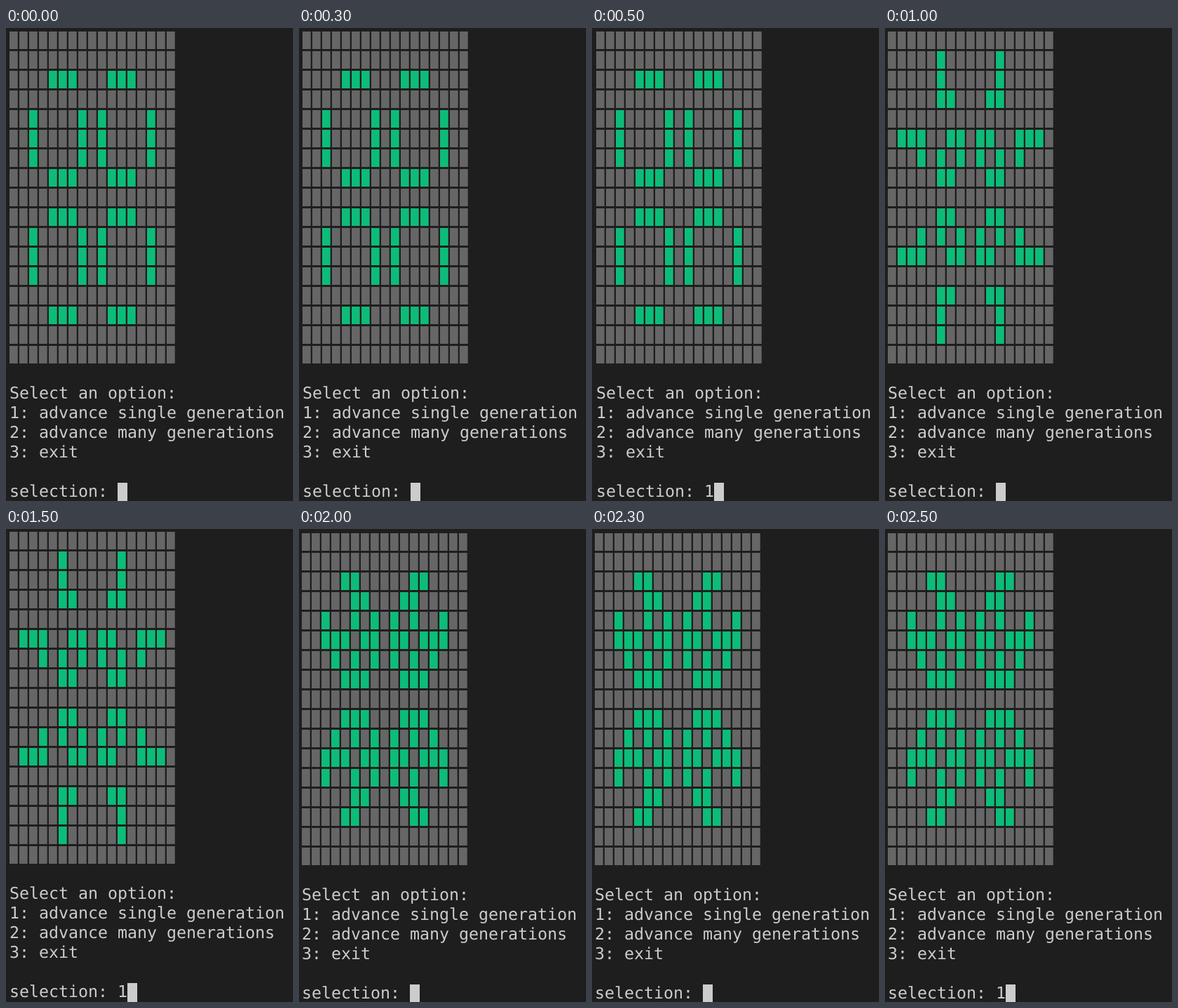
An HTML page that plays this animation: 409 px wide and 674 px high, repeating every 3000 ms.

```html
<!DOCTYPE html>
<html lang="en">
<head>
<meta charset="utf-8">
<title>Game of Life</title>
<style>
  html, body { margin: 0; width: 100%; height: 100%; overflow: hidden; background: #1e1e1e; }
  svg { display: block; width: 409px; height: 674px; }
  text {
    font: 23.254px "DejaVu Sans Mono", "Liberation Mono", monospace;
    fill: #cccccc;
    white-space: pre;
    text-rendering: geometricPrecision;
  }
</style>
</head>
<body>
<svg viewBox="0 0 409 674">
  <g id="screen">
    <path id="dead" fill="#666666"/>
    <path id="live" fill="#0dbc79"/>
    <g id="menu"></g>
    <rect id="cursor" y="643" width="14" height="28" fill="#cccccc"/>
  </g>
</svg>
<script>
const SIZE = 17, COL = 14, ROW = 28, STEP = 500;
const MENU_ROW = 18, PROMPT_ROW = 23, BASELINE = 19;
const PROMPT = 'selection: ';
// Where the terminal sits on the stage in each step
const OFFSETS = [[5, 5], [6, 5], [4, 5], [5, 4], [4, 6], [4, 6]];

const el = id => document.getElementById(id);

// Pulsar: bars lie on lines 2, 7, 9, 14 and span 4-6 and 10-12
const onLine = n => [2, 7, 9, 14].includes(n);
const inSpan = n => (n >= 4 && n <= 6) || (n >= 10 && n <= 12);

function makeGrid(rule) {
  return Array.from({ length: SIZE }, (_, y) =>
    Array.from({ length: SIZE }, (_, x) => rule(x, y)));
}

function advance(grid) {
  return makeGrid((x, y) => {
    let near = 0;
    for (let dy = -1; dy <= 1; dy++)
      for (let dx = -1; dx <= 1; dx++)
        if ((dx || dy) && grid[y + dy]?.[x + dx]) near++;
    return near === 3 || (near === 2 && grid[y][x]);
  });
}

function cellPath(grid, alive) {
  let d = '';
  grid.forEach((line, y) => line.forEach((cell, x) => {
    if (cell === alive) d += `M${x * COL} ${y * ROW}h11.7v25h-11.7z`;
  }));
  return d;
}

function addLine(row, words) {
  const line = document.createElementNS('http://www.w3.org/2000/svg', 'text');
  line.setAttribute('y', row * ROW + BASELINE);
  line.textContent = words;
  el('menu').append(line);
  return line;
}

const first = makeGrid((x, y) => (onLine(x) && inSpan(y)) || (onLine(y) && inSpan(x)));
const second = advance(first);
const paths = [first, second, advance(second)].map(grid => ({
  dead: cellPath(grid, false),
  live: cellPath(grid, true)
}));

['Select an option:',
 '1: advance single generation',
 '2: advance many generations',
 '3: exit'].forEach((words, i) => addLine(MENU_ROW + i, words));
const prompt = addLine(PROMPT_ROW, PROMPT);

let shown = -1;

function draw(time) {
  const step = Math.floor(time / STEP) % OFFSETS.length;
  if (step === shown) return;
  shown = step;
  const { dead, live } = paths[step >> 1];
  const input = PROMPT + (step % 2 ? '1' : '');
  el('dead').setAttribute('d', dead);
  el('live').setAttribute('d', live);
  prompt.textContent = input;
  el('cursor').setAttribute('x', input.length * COL);
  el('screen').setAttribute('transform', `translate(${OFFSETS[step]})`);
}

const start = performance.now();
function tick() {
  draw(performance.now() - start);
  requestAnimationFrame(tick);
}
tick();
</script>
</body>
</html>
```
